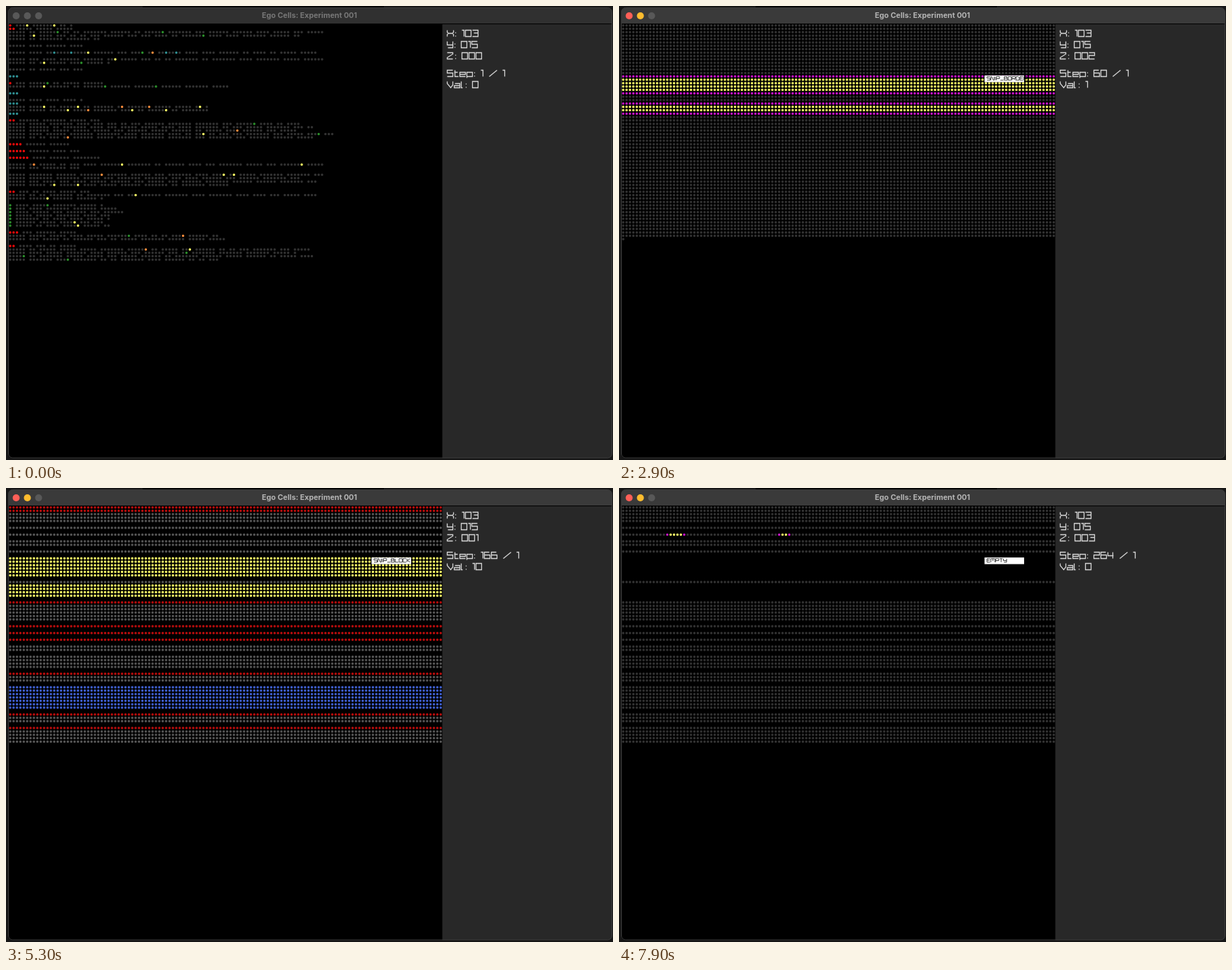
An HTML page with a canvas for the animation above (8000 ms loop, 866 by 647 pixels).

```html
<!DOCTYPE html>
<html lang="en">
<head>
<meta charset="utf-8">
<title>Ego Cells: Experiment 001</title>
<style>
html, body { margin: 0; height: 100%; overflow: hidden; background: #161616; }
canvas { display: block; }
</style>
</head>
<body>
<canvas id="stage" width="866" height="647" role="img" aria-label="Cell grid with step counter"></canvas>
<script>
const ctx = document.getElementById('stage').getContext('2d');
const LOOP = 8000, TICK = 100, COLS = 128, PITCH = 4.836;
const CURSOR = { x: 103, y: 15 };
const color = {
  dim: '#323232', gray: '#555', red: '#f50a0a', darkRed: '#b80d0d', yellow: '#ffff66',
  orange: '#f98c3c', green: '#2b8f2b', teal: '#2f8f92', blue: '#1414f0', royal: '#3f5fd0', purple: '#c814c8'
};

// One character per document line: heading level, long / medium / short text,
// quote or code fence; a space is an empty line.
const layout = '12pps s p ps s ` 1m ` s`mm` 2ppppp 4 5 6 ps pppm 2ps qqqqqqq 3mm 2pppm';
const typicalLength = { p: 91, m: 62, s: 25, q: 30, '`': 3 };

let seed = 11;
function random() {
  seed = (seed * 1664525 + 1013904223) >>> 0;
  return seed / 4294967296;
}
const pick = list => list[Math.floor(random() * list.length)];

let fenced = false;
const lines = [...layout].map(kind => {
  const fence = kind === '`', snip = fence || fenced;
  if (fence) fenced = !fenced;
  return { kind, fence, snip, empty: kind === ' ', quote: kind === 'q', level: Number(kind) || 0 };
});

function makeText({ kind, fence, snip, empty, quote, level }) {
  if (empty) return [];
  if (fence) return Array(3).fill('teal');
  const length = Math.round((typicalLength[kind] || 22) + (random() - 0.5) * 12);
  const cells = Array(length).fill('dim');
  const lead = quote ? 1 : level;
  for (let gap = lead || 5; gap < length - 1; gap += 3 + Math.floor(random() * 6)) {
    cells[gap] = null;
    if (random() < (snip ? 0.5 : 0.1)) cells[gap - 1] = pick(['green', 'orange', 'yellow']);
  }
  return cells.fill(quote ? 'green' : 'red', 0, lead);
}
const textCells = lines.map(makeText);

// Inline code spans in one paragraph, coloured in the text and inline layers.
const INLINE_ROW = 8;
const spans = [[13, 18], [46, 49]];
for (const ends of spans) for (const col of ends) textCells[INLINE_ROW][col] = 'teal';

function blockColor({ empty, snip, quote, level }) {
  if (snip) return 'yellow';
  if (empty) return null;
  return quote ? 'royal' : level ? 'darkRed' : 'gray';
}

function inlineColor(row, col, step) {
  const { empty, snip } = lines[row];
  const reach = step - row + (row < CURSOR.y ? -3 : 1);
  if (empty || snip || col > reach) return null;
  const span = row === INLINE_ROW && spans.find(([from, to]) => col >= from && col <= to);
  return !span ? 'dim' : span.includes(col) ? 'purple' : 'yellow';
}

function cellColor(z, row, col, step) {
  const line = lines[row], front = step + 3;
  if (z === 0) return textCells[row][col];
  if (z === 3) return inlineColor(row, col, step);
  if (row > front || (row === front && col > 0)) return null;
  if (z === 1) return blockColor(line);
  return line.fence ? 'purple' : line.snip ? 'yellow' : 'dim';
}

// Square stroke font: [path, advance], cap height 9.
const glyphs = {
  0: ['M0 0H8V9H0Z'], 1: ['M0 0H3V9', 5], 2: ['M0 0H8V4H0V9H8'],
  3: ['M0 0H8V9H0M2 4H8'], 4: ['M0 0V5H8M7 0V9'], 5: ['M8 0H0V4H8V9H0'],
  6: ['M7 0H0V9H8V4H0'], 7: ['M0 0H8V3L4 9'], 8: ['M0 0H8V9H0ZM0 4H8'], 9: ['M8 5H0V0H8V9H1'],
  X: ['M0 0V3L2 4.5H7L9 3V0M0 9V6L2 4.5M9 9V6L7 4.5', 11], Y: ['M0 0V5H8M8 0V9H1'],
  Z: ['M0 0H8V2L0 7V9H8', 11], S: ['M8 0H0V4H8V9H0'], V: ['M0 0V3L5 9L8 5V0'],
  t: ['M1 0V9H6M0 3H5', 8], e: ['M8 9H0V3H8V6H0'], p: ['M0 11V3H8V9H0'],
  a: ['M1 3H8V9H0V6H8'], l: ['M0 0V9H2', 6], ':': ['M1 3V4.3M1 7.7V9', 3], '/': ['M0 9L11 0', 12], ' ': ['', 7],
  N: ['M0 9V0H2L6 9H8V0'], I: ['M1 0V9', 4], P: ['M0 9V0H8V5H0'], _: ['M0 9H8'],
  B: ['M0 0H7V4H0M7 4H8V9H0V0'], O: ['M0 0H8V9H0Z'], R: ['M0 9V0H8V5H0M4 5L8 9'],
  D: ['M0 0H6L8 2V9H0Z'], E: ['M8 0H0V9H8M0 4H7'], L: ['M0 0V9H8'], C: ['M8 0H0V9H8'],
  K: ['M0 0V9M8 0L1 4.5L8 9'], M: ['M0 9V0H10V9M5 0V6', 12], T: ['M0 0H8M4 0V9']
};
for (const key in glyphs) glyphs[key] = { path: new Path2D(glyphs[key][0]), advance: glyphs[key][1] || 10 };

function write(text, x, y, stroke, scale = 1) {
  ctx.save();
  ctx.translate(x, y);
  ctx.scale(scale, scale);
  ctx.strokeStyle = stroke;
  ctx.lineWidth = 1.3;
  for (const char of text) {
    ctx.stroke(glyphs[char].path);
    ctx.translate(glyphs[char].advance, 0);
  }
  ctx.restore();
}

function rect(fill, x, y, w, h) {
  ctx.fillStyle = fill;
  ctx.fillRect(x, y, w, h);
}

function dot(fill, x, y, r) {
  ctx.fillStyle = fill;
  ctx.beginPath();
  ctx.arc(x, y, r, 0, 7);
  ctx.fill();
}

function drawWindow(active) {
  rect('#161616', 0, 0, 866, 647);
  rect('#000', 195, 0, 344, 2);
  ctx.save();
  ctx.beginPath();
  ctx.roundRect(3, 2.5, 861.5, 642, 6);
  ctx.clip();
  rect('#000', 3, 2, 862, 643);
  rect(active ? '#3a3a3a' : '#303030', 3, 2, 862, 23);
  rect('#282828', 622.5, 26, 242, 619);
  ctx.restore();
  ctx.strokeStyle = '#3c3c3c';
  ctx.lineWidth = 1;
  ctx.beginPath();
  ctx.roundRect(3.5, 2.5, 861, 641.5, 6);
  ctx.stroke();
  const lights = active ? ['#ff5f57', '#febc2e', '#585858'] : Array(3).fill('#585858');
  lights.forEach((fill, i) => dot(fill, 14.5 + 16 * i, 14, 5));
  ctx.font = '700 10.7px Inter, sans-serif';
  ctx.textAlign = 'center';
  ctx.fillStyle = active ? '#b4b4b4' : '#777';
  ctx.fillText('Ego Cells: Experiment 001', 433, 17.3);
}

function drawCells(z, step) {
  const batches = {};
  for (let row = 0; row < lines.length; row++) {
    for (let col = 0; col < COLS; col++) {
      const name = cellColor(z, row, col, step);
      if (!name) continue;
      const x = 6 + col * PITCH, y = 27.7 + row * PITCH;
      const path = batches[name] ||= new Path2D();
      path.moveTo(x + 1.75, y);
      path.arc(x, y, 1.75, 0, 7);
    }
  }
  for (const name in batches) {
    ctx.fillStyle = color[name];
    ctx.fill(batches[name]);
  }
}

function drawPanel(z, step, value) {
  const pad = n => String(n).padStart(3, '0');
  const position = [`X: ${pad(CURSOR.x)}`, `Y: ${pad(CURSOR.y)}`, `Z: ${pad(z)}`];
  const progress = [`Step: ${step} / 1`, `Val: ${value}`];
  position.forEach((text, i) => write(text, 629.5, 34.5 + 16 * i, '#d4d4d4'));
  progress.forEach((text, i) => write(text, 629.5, 91.5 + 16 * i, '#d4d4d4'));
}

// The run starts, pauses briefly, then continues at a slowly falling rate.
const runKeys = [[2000, 12], [3600, 97], [5300, 166], [7100, 233], [LOOP, 268]];

function stepAt(t) {
  if (t < 2000) return t < 1400 ? 1 : t < 1500 ? 5 : 9;
  const i = runKeys.findIndex(([time]) => time > t);
  const [t0, a] = runKeys[i - 1], [t1, b] = runKeys[i];
  return Math.round(a + (b - a) * (t - t0) / (t1 - t0));
}

// The viewer pages down through the layers, back up, and down again.
const layerSwitches = [1500, 2200, 3000, 5000, 5200, 5800, 6800, 7400, 7700];
const layerAt = t => Number('0123210123'[layerSwitches.filter(time => time <= t).length]);

function draw(t) {
  const step = stepAt(t), z = layerAt(t);
  const filled = cellColor(z, CURSOR.y, CURSOR.x, step);
  const [label, value] = !filled ? ['EMPTY', 0] : z === 1 ? ['SNIP_BLOCK', 10] : ['SNIP_BORDER', 1];
  drawWindow(t >= 100);
  drawCells(z, step);
  if (z > 0) {
    rect('#fff', 521.5, 99, 56.5, 9.5);
    write(label, 525, 100.7, '#000', 0.56);
  }
  drawPanel(z, step, value);
}

let shown = -1;
function frame(now) {
  const t = Math.floor(now % LOOP / TICK) * TICK;
  if (t !== shown) draw(shown = t);
  requestAnimationFrame(frame);
}
requestAnimationFrame(frame);
</script>
</body>
</html>
```
